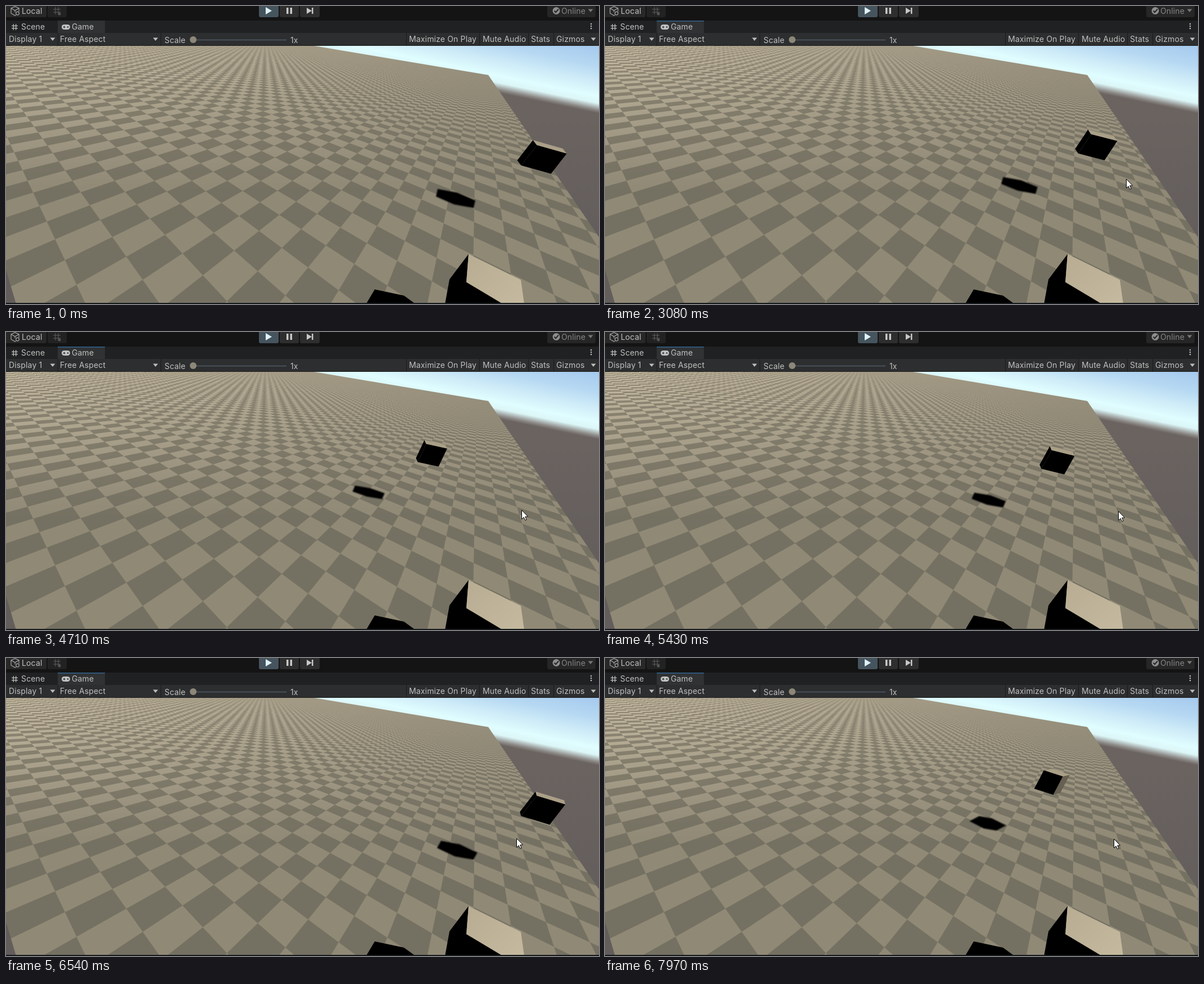
Recreate the animation shown at these times as an HTML page with a canvas. Size 1055 by 531 pixels, loop 8 s.

```html
<!DOCTYPE html>
<html lang="en">
<head>
<meta charset="utf-8">
<title>Editor game view</title>
<style>
html, body { margin: 0; width: 100%; height: 100%; overflow: hidden; background: #141414; }
canvas { display: block; }
</style>
</head>
<body>
<canvas id="stage" width="1055" height="531"></canvas>
<script>
const W = 1055, H = 531, TOP = 71, LOOP = 8000;
const ctx = document.getElementById('stage').getContext('2d');

// ---------- helpers ----------
const clamp = (x, a = 0, b = 1) => Math.min(b, Math.max(a, x));
const mix = (a, b, k) => a + (b - a) * k;
const smooth = (a, b, x) => { const k = clamp((x - a) / (b - a)); return k * k * (3 - 2 * k); };
const add = (a, b) => [a[0] + b[0], a[1] + b[1]];
const sub = (a, b) => [a[0] - b[0], a[1] - b[1]];

function path(c, pts) {
  c.beginPath();
  for (let i = 0; i < pts.length; i += 2) c.lineTo(pts[i], pts[i + 1]);
  c.closePath();
}
function poly(c, fill, ...pts) {
  path(c, pts.flat());
  c.fillStyle = fill;
  c.fill();
}
function box(c, fill, x, y, w, h) {
  c.fillStyle = fill;
  c.fillRect(x, y, w, h);
}
function disc(c, fill, x, y, r) {
  c.beginPath();
  c.arc(x, y, r, 0, 7);
  c.fillStyle = fill;
  c.fill();
}
function label(c, text, x, y, fill = '#c0c0c0') {
  c.font = '14px Inter, "Open Sans", sans-serif';
  c.letterSpacing = '0.15px';
  c.fillStyle = fill;
  c.fillText(text, x, y);
}
function layer() {
  const el = document.createElement('canvas');
  el.width = W;
  el.height = H;
  return el;
}

// ---------- checkered ground in perspective ----------
// One grid corner, the vanishing points of both line families and the depth gained per cell.
const corner = [314, 441], farRight = [838, 94], farLeft = [-120, -25];
const stepU = 0.119, stepV = 0.077, SAMPLES = 4;

function ground() {
  const el = layer(), c = el.getContext('2d');
  const img = c.createImageData(W, H);
  const [px, py] = sub(farRight, corner), [qx, qy] = sub(farLeft, corner);
  const det = px * qy - py * qx;
  const weights = (x, y) => {
    const dx = x - corner[0], dy = y - corner[1];
    const a = (dx * qy - dy * qx) / det, b = (px * dy - py * dx) / det;
    return [a, b, 1 - a - b];
  };
  for (let y = TOP; y < H; y++) {
    for (let x = 0; x < W; x++) {
      const near = weights(x, y)[2];
      let lit = 0;
      for (let i = 0; i < SAMPLES * SAMPLES; i++) {
        const [a, b, g] = weights(x + (i % SAMPLES + 0.5) / SAMPLES,
          y + (Math.floor(i / SAMPLES) + 0.5) / SAMPLES);
        const sum = Math.floor(a / (g * stepU)) + Math.floor(b / (g * stepV));
        lit += sum & 1 ? 0 : 1;
      }
      const k = 0.5 + (lit / SAMPLES ** 2 - 0.5) * smooth(0.01, 0.16, near);
      const glow = clamp((340 - y) / 270) ** 1.4 * (1 - x / 2000);
      const o = (y * W + x) * 4;
      img.data[o] = mix(mix(117, 148, glow), mix(144, 202, glow), k);
      img.data[o + 1] = mix(mix(113, 139, glow), mix(137, 191, glow), k);
      img.data[o + 2] = mix(mix(98, 119, glow), mix(118, 166, glow), k);
      img.data[o + 3] = 255;
    }
  }
  c.putImageData(img, 0, 0);
  return el;
}

function sky(c) {
  const g = c.createLinearGradient(1055, 71, 1027.9, 202.4);
  [[0, '#a5c9ee'], [0.27, '#b6d8f2'], [0.48, '#cfecf8'], [0.66, '#e0fdff'],
   [0.75, '#dcf6f7'], [0.84, '#8a8683'], [0.88, '#6a6360']].forEach(s => g.addColorStop(...s));
  box(c, g, 0, TOP, W, H - TOP);
  const fade = c.createLinearGradient(0, 200, 0, 420);
  fade.addColorStop(0, 'rgba(96,91,90,0)');
  fade.addColorStop(1, 'rgba(96,91,90,.7)');
  box(c, fade, 0, 200, W, H - 200);
}

function nearCube(c) {
  c.filter = 'blur(.7px)';
  poly(c, '#000', 656, 505, 708, 516, 730, 532, 640, 532);
  c.filter = 'none';
  poly(c, '#000', 823, 442, 819, 492, 886, 531, 781, 531, 789, 487);
  const g = c.createLinearGradient(830, 450, 910, 530);
  g.addColorStop(0, '#b9ae94');
  g.addColorStop(1, '#c4b99e');
  poly(c, g, 823, 442, 916, 488, 922, 531, 884, 531, 819, 492);
}

// ---------- editor bars ----------
function gridIcon(c, x, y, s, color) {
  c.strokeStyle = color;
  c.lineWidth = 1.2;
  c.beginPath();
  for (const k of [0.3, 0.7]) {
    c.moveTo(x + s * k, y); c.lineTo(x + s * k, y + s);
    c.moveTo(x, y + s * k); c.lineTo(x + s, y + s * k);
  }
  c.stroke();
}
function caret(c, x, y, color = '#bdbdbd') {
  poly(c, color, x - 4.5, y - 2.5, x + 4.5, y - 2.5, x, y + 3);
}
function pill(c, fill, x, y, w, h, r) {
  c.beginPath();
  c.roundRect(x, y, w, h, r);
  c.fillStyle = fill;
  c.fill();
}
const button = (c, fill, x, w) => pill(c, fill, x, -6, w, 26, 3);

function topBar(c) {
  box(c, '#141414', 0, 0, W, 26);
  button(c, '#282828', -6, 78);
  button(c, '#222', 74, 34);
  c.strokeStyle = '#a8a8a8';
  c.lineWidth = 1.2;
  path(c, [9, 4, 16, 1, 23, 4, 23, 13, 16, 17, 9, 13]);
  c.stroke();
  c.beginPath();
  c.moveTo(9, 4); c.lineTo(16, 8); c.lineTo(23, 4);
  c.moveTo(16, 8); c.lineTo(16, 11);
  c.stroke();
  disc(c, '#282828', 20.5, 13, 4.2);
  c.beginPath();
  c.arc(20.5, 13, 2.8, 0, 7);
  c.stroke();
  label(c, 'Local', 28, 14);
  gridIcon(c, 84, 2, 13, '#555');
  disc(c, '#555', 95, 14, 2.5);

  button(c, '#46545e', 450, 35);
  button(c, '#2e2e2e', 487, 34);
  button(c, '#2e2e2e', 523, 35);
  poly(c, '#dff3fb', 462, 2, 473, 8.5, 462, 15);
  box(c, '#c8c8c8', 499, 3, 3.5, 11);
  box(c, '#c8c8c8', 505.5, 3, 3.5, 11);
  poly(c, '#c8c8c8', 535, 3, 544, 8.5, 535, 14);
  box(c, '#c8c8c8', 544, 3, 2.5, 11);

  button(c, '#262626', 963, 86);
  disc(c, '#8e8e8e', 979, 8.5, 6.5);
  c.strokeStyle = '#262626';
  c.lineWidth = 2;
  c.beginPath();
  c.moveTo(975.5, 8.5); c.lineTo(978, 11.2); c.lineTo(983, 5.5);
  c.stroke();
  label(c, 'Online', 988, 14, '#858585');
  caret(c, 1040, 8, '#777');
}

function tabs(c) {
  box(c, '#202122', 0, 26, W, 22);
  box(c, '#303233', 92, 26, 84, 22);
  gridIcon(c, 10, 32, 11, '#c2c2c2');
  label(c, 'Scene', 27, 42);
  pill(c, '#c2c2c2', 99, 33, 15, 9, 4.5);
  box(c, '#303233', 101.5, 37, 4, 1.2);
  box(c, '#303233', 103, 35.5, 1.2, 4);
  disc(c, '#303233', 110, 37.5, 1.3);
  label(c, 'Game', 117, 42);
  for (const y of [32, 36, 40]) disc(c, '#c2c2c2', 1041, y, 1.3);
}

function toolbar(c) {
  box(c, '#2d2e2f', 0, 48, W, 23);
  box(c, '#1c1c1c', 0, 70, W, 1);
  for (const x of [92, 275, 712, 842, 929, 974]) box(c, '#1b1b1b', x, 48, 1, 23);
  for (const x of [83, 266, 1045]) caret(c, x, 59);
  label(c, 'Display 1', 5, 64);
  label(c, 'Free Aspect', 96, 64);
  label(c, 'Scale', 282, 66);
  box(c, '#47505b', 333, 59.5, 166, 2);
  disc(c, '#8c8779', 333, 60, 6);
  label(c, '1x', 506, 66);
  label(c, 'Maximize On Play', 717, 64);
  label(c, 'Mute Audio', 848, 64);
  label(c, 'Stats', 934, 64);
  label(c, 'Gizmos', 979, 64);
}

function backdrop() {
  const el = layer(), c = el.getContext('2d');
  sky(c);
  c.save();
  path(c, [0, 71, 548, 71, 858, 123, 1055, 412, 1055, 531, 18, 531, 0, 470]);
  c.clip();
  c.drawImage(ground(), 0, 0);
  c.restore();
  nearCube(c);
  topBar(c);
  tabs(c);
  toolbar(c);
  box(c, '#161a1c', 0, 529, W, 2);
  return el;
}

// ---------- motion ----------
// Cubic through [time, ...values] keys, with zero slope at every peak.
function curve(keys, t, n = 1) {
  const last = keys.length - 1;
  if (t <= keys[0][0]) return keys[0][n];
  if (t >= keys[last][0]) return keys[last][n];
  let i = 0;
  while (t >= keys[i + 1][0]) i++;
  const rate = j => (keys[j + 1][n] - keys[j][n]) / (keys[j + 1][0] - keys[j][0]);
  const tangent = j => {
    if (j === 0) return rate(0);
    if (j === last) return rate(last - 1);
    const a = rate(j - 1), b = rate(j);
    return a * b <= 0 ? 0 : 2 * a * b / (a + b);
  };
  const a = keys[i][n], b = keys[i + 1][n], d = keys[i + 1][0] - keys[i][0];
  const k = (t - keys[i][0]) / d, m = 1 - k;
  return a * m * m * (1 + 2 * k) + b * k * k * (3 - 2 * k)
    + d * k * m * (m * tangent(i) - k * tangent(i + 1));
}

// Share of the way from the right end to the left end.
const travel = [[2590, 0], [3080, 0.4], [4430, 0.86], [4860, 1.02], [5330, 0.81],
  [6030, 0.335], [6600, 0], [7110, 0.315], [7970, 0.835]];
const pointerKeys = [[1190, 972, 484], [1420, 920, 437], [1950, 920, 437], [1960, 917, 428],
  [2500, 926, 310], [3080, 927, 308], [4710, 917, 317], [6030, 910, 320], [7970, 905, 322]];

function cube(t) {
  const k = curve(travel, t);
  const r = 2 * clamp((t - 4710) / 3260) ** 2;

  const mid = [800 - 157 * k + 6 * r, 343 - 58 * k];
  const a = [32 - 8 * k - 5 * r, 17 - 5 * k];
  const b = [35 - 6.5 * k + 1.5 * r, 3.5 - 2 * k + r];
  const c = [-3 - 2 * r, 10.5 - 3 * k + 0.6 * r];
  ctx.filter = 'blur(.9px)';
  poly(ctx, '#000', sub(mid, a), sub(mid, c), add(mid, b), add(mid, a), add(mid, c), sub(mid, b));
  ctx.filter = 'none';

  // Front face from its centre and two half edges, pushed back by one depth vector.
  const face = [957 - 201 * k, 273.5 - 54.5 * k - 3 * r];
  const side = [26.5 - 8 * k - 1.5 * r, 7.5 - 3.5 * k + 0.4 * r];
  const down = [-14 + 6.5 * k, 18 - 2 * k];
  const depth = [-7 + 4 * k + 8 * r, -9 + 2 * k + 2.2 * r];
  const tr = add(sub(face, down), side), tl = sub(sub(face, down), side);
  const br = add(add(face, down), side), bl = sub(add(face, down), side);
  const wall = (fill, p, q) => poly(ctx, fill, p, q, add(q, depth), add(p, depth));
  wall('#675f50', tr, br);
  wall('#000', tl, bl);
  wall('#aa9f87', tl, tr);
  poly(ctx, '#000', tl, tr, br, bl);
}

function pointer(t) {
  if (t < 1190) return;
  const at = n => Math.round(curve(pointerKeys, t, n)) + 0.5;
  ctx.save();
  ctx.translate(at(1), at(2));
  path(ctx, [0, 0, 0, 16, 3.6, 12.6, 6.2, 18, 8.6, 17, 6.2, 11.6, 11, 11.4]);
  ctx.fillStyle = '#fff';
  ctx.fill();
  ctx.strokeStyle = '#000';
  ctx.lineWidth = 1;
  ctx.stroke();
  ctx.restore();
}

const scene = backdrop();

function draw(now) {
  const t = now % LOOP;
  ctx.drawImage(scene, 0, 0);
  if (t >= 2550) box(ctx, '#32638f', 92, 26, 84, 1.5);
  cube(t);
  pointer(t);
}

let start;
function tick(now) {
  start ??= now;
  draw(now - start);
  requestAnimationFrame(tick);
}
draw(0);
requestAnimationFrame(tick);
</script>
</body>
</html>
```
